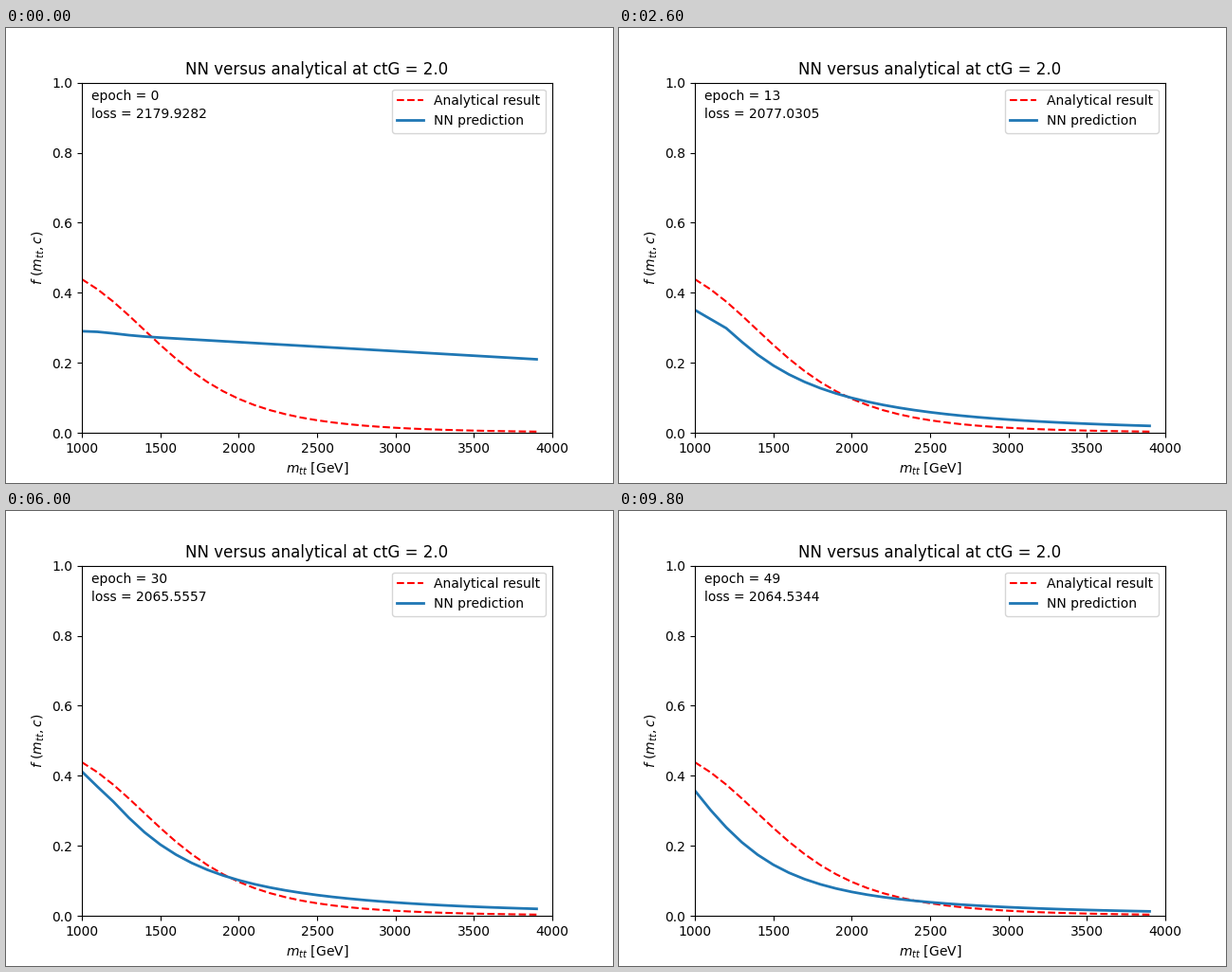
Write a matplotlib script that moves like this. It is 640 by 480 pixels and loops after 10000 ms.

```python
import numpy as np
import matplotlib.pyplot as plt
from matplotlib.animation import FuncAnimation

FRAMES, INTERVAL = 50, 200
FIRST_KEY = 9          # epoch where the first broad shape is learned
LOSS_FLOOR = 2064.2

mass = np.arange(1000, 4000, 100)
tev = mass / 1000
log_m = np.log(tev)

# Key epochs of the training and the shape parameters reached there
key_epochs = [9, 17, 22, 30, 41, 49]
level = [.40, .56, .485, .475, .75, .92]       # offset of the power-law tail
bend = [.065, .175, .19, .25, .25, .335]       # dip below the tail at low mass
plateau = [.33, .18, .165, .13, .06, 0]        # flattening at the left edge
losses = np.array([2179.9282, 2087.1104, 2071.3855, 2069.5710,
                   2065.5557, 2064.7664, 2064.5344])


def bump(x, width):
    return np.exp(-(x / width) ** 2)


def analytic():
    return 1 / (2 + 0.279 * tev ** (4.75 + 0.2 * log_m))


def untrained():
    """Log odds of the nearly straight curve before training."""
    f = 0.285 - 0.0258 * (tev - 1) + 0.0063 * bump(tev - 1.08, 0.2)
    return np.log(1 / f - 1)


def trained(epoch):
    a, d, e = (np.interp(epoch, key_epochs, p) for p in (level, bend, plateau))
    return a + 2.5 * log_m - d * bump(log_m, 0.49) + e * bump(log_m, 0.115)


def prediction(epoch):
    u = min(epoch / FIRST_KEY, 1)
    w = 1 - (1 - u) ** 1.6
    z = (1 - w) * untrained() + w * trained(epoch)
    return 1 / (1 + np.exp(z))


def loss_at(epoch):
    """Loss decays exponentially towards its floor between key epochs."""
    excess = np.log(losses - LOSS_FLOOR)
    return LOSS_FLOOR + np.exp(np.interp(epoch, [0] + key_epochs, excess))


fig, ax = plt.subplots(figsize=(6.4, 4.8), dpi=100)
ax.set_xlim(1000, 4000)
ax.set_ylim(0, 1)
ax.set_title("NN versus analytical at ctG = 2.0")
ax.set_xlabel(r"$m_{tt}$ [GeV]")
ax.set_ylabel(r"$f\ (m_{tt}, c)$")

ax.plot(mass, analytic(), "r--", lw=1.5, label="Analytical result")
fit_line, = ax.plot([], [], color="C0", lw=2, label="NN prediction")
ax.legend(loc="upper right")
epoch_text = ax.text(0.02, 0.95, "", transform=ax.transAxes)
loss_text = ax.text(0.02, 0.90, "", transform=ax.transAxes)


def update(epoch):
    fit_line.set_data(mass, prediction(epoch))
    epoch_text.set_text(f"epoch = {epoch}")
    loss_text.set_text(f"loss = {loss_at(epoch):.4f}")
    return fit_line, epoch_text, loss_text


def init():
    return update(0)


anim = FuncAnimation(fig, update, frames=FRAMES, init_func=init,
                     interval=INTERVAL, repeat=True, repeat_delay=0)
plt.show()
```
